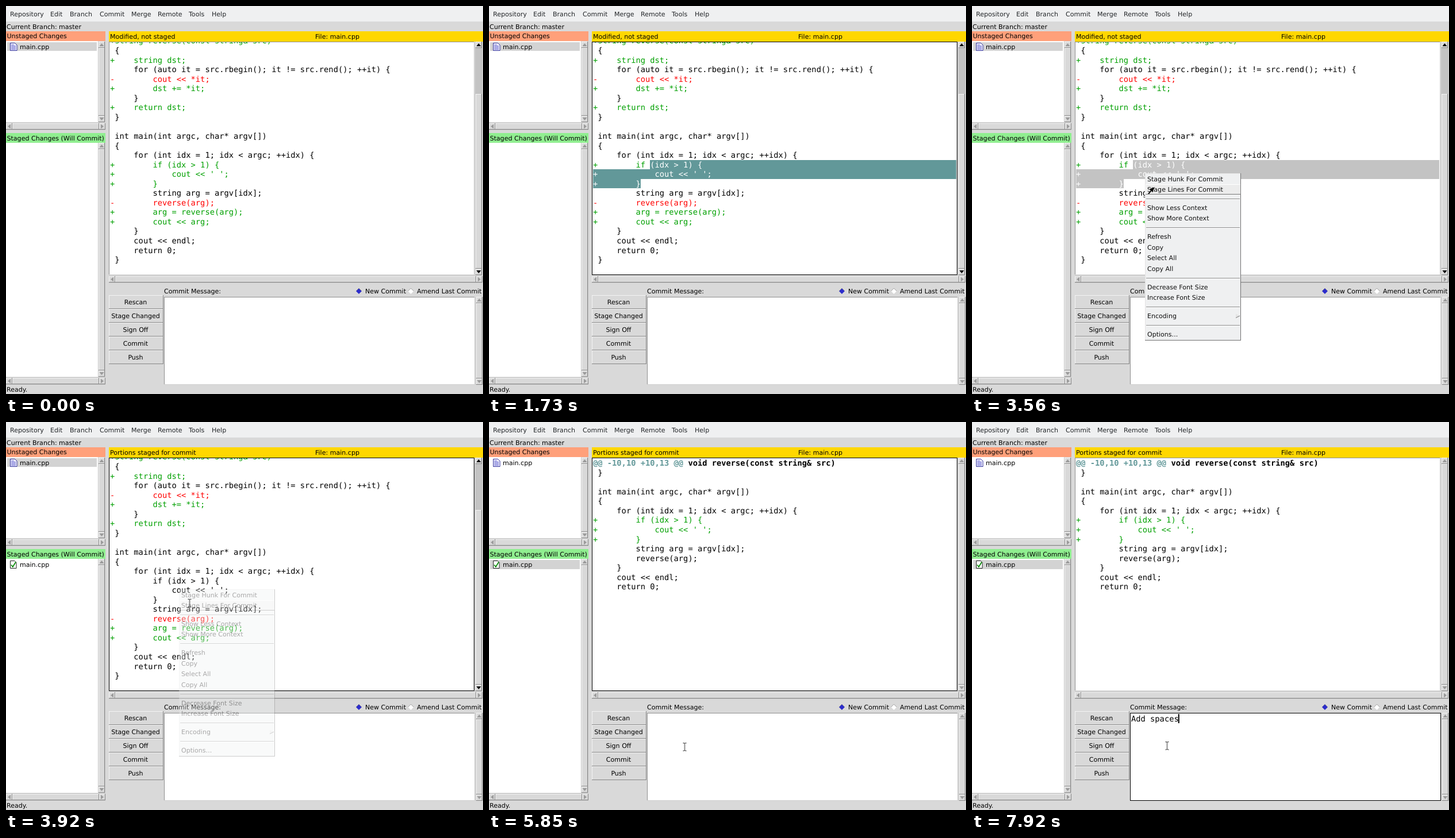
An HTML page for the animation above (8000 ms loop, 830 by 675 pixels).

```html
<!DOCTYPE html>
<html lang="en">
<head>
<meta charset="utf-8">
<title>Staging lines</title>
<style>
html, body { margin: 0; width: 100%; height: 100%; overflow: hidden; background: #d9d9d9; }
svg { display: block; width: 830px; height: 675px; }
rect { shape-rendering: crispEdges; }
text { font: 11.05px "DejaVu Sans", sans-serif; text-rendering: geometricPrecision; white-space: pre; }
.code text { font: 13.74px "DejaVu Sans Mono", monospace; }
.code .bold { font-weight: bold; }

/* 1% = 80 ms */
.pre, .post, .old, .new, .ring, .entry, .selA, .selB, .selC, .selC rect,
.item1, .item2, .arrow, .beam, .caret { animation: 8s step-end infinite; }

.pre { animation-name: pre; }
.post { animation-name: post; }
.old { animation-name: old; }
.new { animation-name: new; }
@keyframes pre { 0% { opacity: 1 } 48.5%, 100% { opacity: 0 } }
@keyframes post { 0% { opacity: 0 } 48.5%, 100% { opacity: 1 } }
@keyframes old { 0% { opacity: 1 } 67%, 100% { opacity: 0 } }
@keyframes new { 0% { opacity: 0 } 67%, 100% { opacity: 1 } }

.ring { animation-name: ring; }
.entry { animation-name: entry; }
@keyframes ring {
  0% { opacity: 0 } 14.875% { opacity: 1 } 33.75% { opacity: 0 }
  47.5% { opacity: 1 } 76.75%, 100% { opacity: 0 }
}
@keyframes entry { 0% { opacity: 0 } 76.75%, 100% { opacity: 1 } }

.selA { animation-name: selA; }
.selB { animation-name: selB; }
.selC { animation-name: selC; }
.selC rect { animation-name: blur; }
@keyframes selA { 0% { opacity: 0 } 17.25% { opacity: 1 } 17.875%, 100% { opacity: 0 } }
@keyframes selB { 0% { opacity: 0 } 17.875% { opacity: 1 } 21.625%, 100% { opacity: 0 } }
@keyframes selC { 0% { opacity: 0 } 21.625% { opacity: 1 } 48.5%, 100% { opacity: 0 } }
@keyframes blur { 0% { fill: #629899 } 33.75% { fill: #c3c3c3 } 47.5%, 100% { fill: #629899 } }

.menu { animation: menu 8s linear infinite; }
.item1 { animation-name: item1; }
.item2 { animation-name: item2; }
@keyframes menu {
  0%, 33.75% { opacity: 0 }
  36.375% { opacity: 1 }
  47.5% { opacity: 1; animation-timing-function: cubic-bezier(.215, .61, .355, 1) }
  53%, 100% { opacity: 0 }
}
@keyframes item1 { 0% { opacity: 0 } 39.4% { opacity: 1 } 41.7%, 100% { opacity: 0 } }
@keyframes item2 { 0% { opacity: 0 } 41.7%, 100% { opacity: 1 } }

.mouse { animation: mouse 8s ease-in-out infinite; }
.arrow { animation-name: arrow; }
.beam { animation-name: beam; }
@keyframes mouse {
  0%, 38.5% { transform: translate(300.5px, 290.5px) }
  42.375%, 44% { transform: translate(317px, 315px) }
  45.25%, 55.2% { transform: translate(319.5px, 314.7px); animation-timing-function: ease-in }
  56.25% { transform: translate(317px, 318.5px); animation-timing-function: ease-out }
  64.375%, 68.6% { transform: translate(111px, 248px) }
  72.2% { transform: translate(339px, 568px) }
  73.125%, 76.4% { transform: translate(340.5px, 565px) }
  77.875%, 100% { transform: translate(339.5px, 563px) }
}
@keyframes arrow {
  0% { opacity: 0 } 33.75% { opacity: 1 } 48% { opacity: 0 }
  59.7% { opacity: 1 } 71.1%, 100% { opacity: 0 }
}
@keyframes beam {
  0% { opacity: 0 } 48% { opacity: 1 } 59.7% { opacity: 0 } 71.1%, 100% { opacity: 1 }
}

.caret { animation-name: type; }
@keyframes type {
  0% { transform: translateX(0) }
  83.125% { transform: translateX(8.27px) }
  85.75% { transform: translateX(16.54px) }
  87.5% { transform: translateX(24.81px) }
  88% { transform: translateX(33.08px) }
  90.875% { transform: translateX(41.35px) }
  92.625% { transform: translateX(49.62px) }
  94.375% { transform: translateX(57.89px) }
  95.9% { transform: translateX(66.16px) }
  97.4% { transform: translateX(74.43px) }
  99%, 100% { transform: translateX(82.7px) }
}
</style>
</head>
<body>
<svg id="app" viewBox="0 0 830 675" xmlns="http://www.w3.org/2000/svg"></svg>
<script>
const CH = 8.27, LH = 16.55, LEFT = 181;
const FACE = '#d9d9d9', DARK = '#868686', GREEN = '#00a000', TEAL = '#629899';
const tint = { '+': GREEN, '-': '#ff0000' };

const esc = s => s.replace(/&/g, '&amp;').replace(/</g, '&lt;');
const rect = (x, y, w, h, fill, more = '') =>
  `<rect x="${x}" y="${y}" width="${w}" height="${h}" fill="${fill}" ${more}/>`;
const text = (x, y, s, more = '') => `<text x="${x}" y="${y}" xml:space="preserve" ${more}>${esc(s)}</text>`;
const group = (cls, ...parts) => `<g class="${cls}">${parts.join('')}</g>`;
const path = (d, fill, more = '') => `<path d="${d}" fill="${fill}" ${more}/>`;

// Filled box with a one pixel bevel
const bevel = (x, y, w, h, fill = FACE, lit = '#f4f4f4', dim = DARK) =>
  rect(x, y, w, h, dim) + rect(x, y, w - 1, h - 1, lit) + rect(x + 1, y + 1, w - 2, h - 2, fill);
const frame = (x, y, w, h) =>
  rect(x + .5, y + .5, w - 1, h - 1, 'none', 'stroke="#000"');
const field = (x, y, w, h) => bevel(x, y, w, h, '#fff', '#8f8f8f', '#d0d0d0');

// Scrollbar: [from, to] is the slider's place along the bar
function bar(x, y, w, h, from, to, ink = '#9a9a9a') {
  const tall = h > w, len = tall ? h : w, b = 11;
  const part = (a, z) => tall ? bevel(x + 1, y + a, w - 2, z - a) : bevel(x + a, y + 1, z - a, h - 2);
  const tip = (at, dir) => {
    const cx = tall ? x + w / 2 : x + at, cy = tall ? y + at : y + h / 2, d = 2.5 * dir;
    return path(tall ? `M${cx - 4} ${cy - d}h8L${cx} ${cy + d}z` : `M${cx - d} ${cy - 4}v8L${cx + d} ${cy}z`, ink);
  };
  return rect(x, y, w, h, '#c3c3c3') + part(0, b) + part(len - b, len) +
    part(from ?? b, to ?? len - b) + tip(5.5, -1) + tip(len - 5.5, 1);
}

const code = (src, top, fill) => group('code', ...src.split('\n').map((line, i) =>
  line.trim() ? text(LEFT, (top + i * LH + 12.9).toFixed(2), line, `fill="${fill || tint[line[0]] || '#000'}"`) : ''));

// Selected text: rows of [line, first column, end x]
const ROW = 69.1, IF_TOP = ROW + 12 * LH;
const ifLines = `+        if (idx > 1) {
+            cout << ' ';
+        }`;
function selection(name, rows) {
  const boxes = rows.map(([n, col, end]) => {
    const x = LEFT + col * CH;
    return rect(x, IF_TOP + n * LH, end - x, LH, TEAL);
  }).join('');
  return `<clipPath id="${name}">${boxes}</clipPath>` +
    group(name, boxes, `<g clip-path="url(#${name})">${code(ifLines, IF_TOP, '#fff')}</g>`);
}

const worktree = `+string reverse(const string& src)
 {
+    string dst;
     for (auto it = src.rbegin(); it != src.rend(); ++it) {
-        cout << *it;
+        dst += *it;
     }
+    return dst;
 }

 int main(int argc, char* argv[])
 {
     for (int idx = 1; idx < argc; ++idx) {



         string arg = argv[idx];
-        reverse(arg);
+        arg = reverse(arg);
+        cout << arg;
     }
     cout << endl;
     return 0;
 }`;
const index = ` }

 int main(int argc, char* argv[])
 {
     for (int idx = 1; idx < argc; ++idx) {
${ifLines}
         string arg = argv[idx];
         reverse(arg);
     }
     cout << endl;
     return 0;`;

const paper = y => path(`M7.5 ${y}h8l3.5 3.5v9.5h-11.5z`, '#fff', 'stroke="#2b2b9c"');
const modIcon = paper(64.5) + path('M9 67.5h5M9 69.5h8M9 71.5h8M9 73.5h8M9 75.5h8', 'none', 'stroke="#5b5bd0"');
const okIcon = path('M7.5 241.5h7.5l3 3v10h-10.5z', '#fff', 'stroke="#222"') +
  path('M9 248.5l2.8 3.5L17 243.5', 'none', 'stroke="#0a8a0a" stroke-width="1.8"');

const menubar = rect(0, 0, 830, 27, '#eff0f1') +
  Object.entries({ Repository: 7, Edit: 77, Branch: 111, Commit: 163, Merge: 218, Remote: 264, Tools: 318, Help: 358 })
    .map(([s, x]) => text(x, 17.5, s, 'fill="#232629"')).join('');

const lists = rect(0, 44, 173, 17, '#ffa07a') + text(1.5, 56, 'Unstaged Changes') +
  rect(0, 61, 160, 141, '#fff') + group('old', rect(2, 63, 156, 15, '#d3d3d3')) +
  modIcon + text(24, 74.7, 'main.cpp') +
  bar(160, 62, 13, 140) + bar(0, 203, 173, 13) +
  rect(0, 221, 173, 17, '#90ee90') + text(1.5, 233.6, 'Staged Changes (Will Commit)') +
  rect(0, 238, 160, 407, '#fff') + group('new', rect(2, 240, 156, 16, '#d3d3d3')) +
  group('post', okIcon, text(24, 252, 'main.cpp')) +
  bar(160, 238, 13, 407) + bar(0, 646, 173, 13);

const diff = rect(179, 44, 651, 18, '#ffd700') + text(538, 57, 'File: main.cpp') +
  group('pre', text(181, 57, 'Modified, not staged')) +
  group('post', text(181, 57, 'Portions staged for commit')) +
  field(179, 62, 636, 406) +
  '<clipPath id="view"><rect x="180" y="63" width="634" height="404"/></clipPath><g clip-path="url(#view)">' +
  group('old', code(worktree, ROW - LH),
    group('pre', code(ifLines, IF_TOP)),
    group('post', code(ifLines.replace(/\+/g, ' '), IF_TOP)),
    selection('selA', [[0, 12, 813], [1, 0, 280.2]]),
    selection('selB', [[0, 12, 813], [1, 0, 263.7]]),
    selection('selC', [[0, 12, 813], [1, 0, 813], [2, 0, 263.7]])) +
  group('new', group('code',
      text(LEFT, 76.1, '@@ -10,10 +10,13 @@', `class="bold" fill="${TEAL}"`),
      text(LEFT + 20 * CH, 76.1, 'void reverse(const string& src)', 'class="bold"')),
    code(index, 63.2 + LH)) +
  '</g>' + group('ring', frame(179, 62, 636, 406)) +
  group('old', bar(816, 62, 13, 406, 91, 395, '#000')) + group('new', bar(816, 62, 13, 406)) +
  bar(179, 469, 650, 13);

const diamond = (x, fill) => path(`M${x - 5} 496l5 -5l5 5l-5 5z`, fill) +
  path(`M${x - 5} 496l5 -5l5 5`, 'none', 'stroke="#8a8a8a" stroke-width=".8"');
const commit = text(275, 500.2, 'Commit Message:') +
  diamond(614, '#2c2ccc') + text(625, 500.2, 'New Commit') +
  diamond(704.5, '#fff') + text(715, 500.2, 'Amend Last Commit') +
  ['Rescan', 'Stage Changed', 'Sign Off', 'Commit', 'Push'].map((s, i) =>
    bevel(179, 503 + 24 * i, 95, 24) + text(225.5, 519 + 24 * i, s, 'text-anchor="middle"')).join('') +
  field(275, 506, 541, 153) +
  group('entry', group('code', text(277, 520.8, 'Add spaces')),
    group('caret', rect(277, 508, 90, 17, '#fff'), rect(276.4, 508, 1.6, 16, '#000')),
    frame(275, 506, 541, 153)) +
  bar(817, 506, 13, 153) + text(1, 671.3, 'Ready.');

// Items in blocks, with a rule between blocks
function popup() {
  const blocks = ['Stage Hunk For Commit,Stage Lines For Commit', 'Show Less Context,Show More Context',
    'Refresh,Copy,Select All,Copy All', 'Decrease Font Size,Increase Font Size', 'Encoding', 'Options...'];
  let y = 300.6, out = '';
  blocks.forEach((block, i) => {
    if (i) {
      out += rect(303, Math.round(y - 16), 163, 1, '#8c8c8c') + rect(303, Math.round(y - 15), 163, 1, '#fff');
      }
    for (const item of block.split(',')) {
      out += text(305, y + 4, item, 'fill="#111"');
      if (item === 'Encoding') out += path(`M459 ${y - 3.5}l7 3.5l-7 3.5z`, '#e4e4e4') +
        path(`M466 ${y}l-7 3.5`, 'none', 'stroke="#777"');
      y += 18.4;
    }
    y += 13.6;
  });
  return group('menu', bevel(301, 291, 167, 291, '#eff0f1', '#e4e4e4', '#707070'),
    group('item1', bevel(302, 292, 166, 18, '#ececec', '#fff', '#777')),
    group('item2', bevel(302, 310, 166, 18, '#ececec', '#fff', '#777')), out);
}

const mouse = group('mouse',
  group('arrow', path('M0 0L-9.8 3.8L-6.8 5.4L-11.8 11.3L-10.2 12.8L-5.4 6.8L-4 9.8Z', '#000',
    'stroke="#fff" stroke-width=".9" paint-order="stroke"')),
  group('beam', path('M-3 -6.5h2.2l.8 .8l.8 -.8h2.2M0 -6v12.5M-3 7h2.2l.8 -.8l.8 .8h2.2', 'none', 'stroke="#222"')));

document.getElementById('app').innerHTML = rect(0, 0, 830, 675, FACE) + menubar +
  text(1, 39.5, 'Current Branch:') + text(92, 39.5, 'master') +
  lists + diff + commit + popup() + mouse;
</script>
</body>
</html>
```
